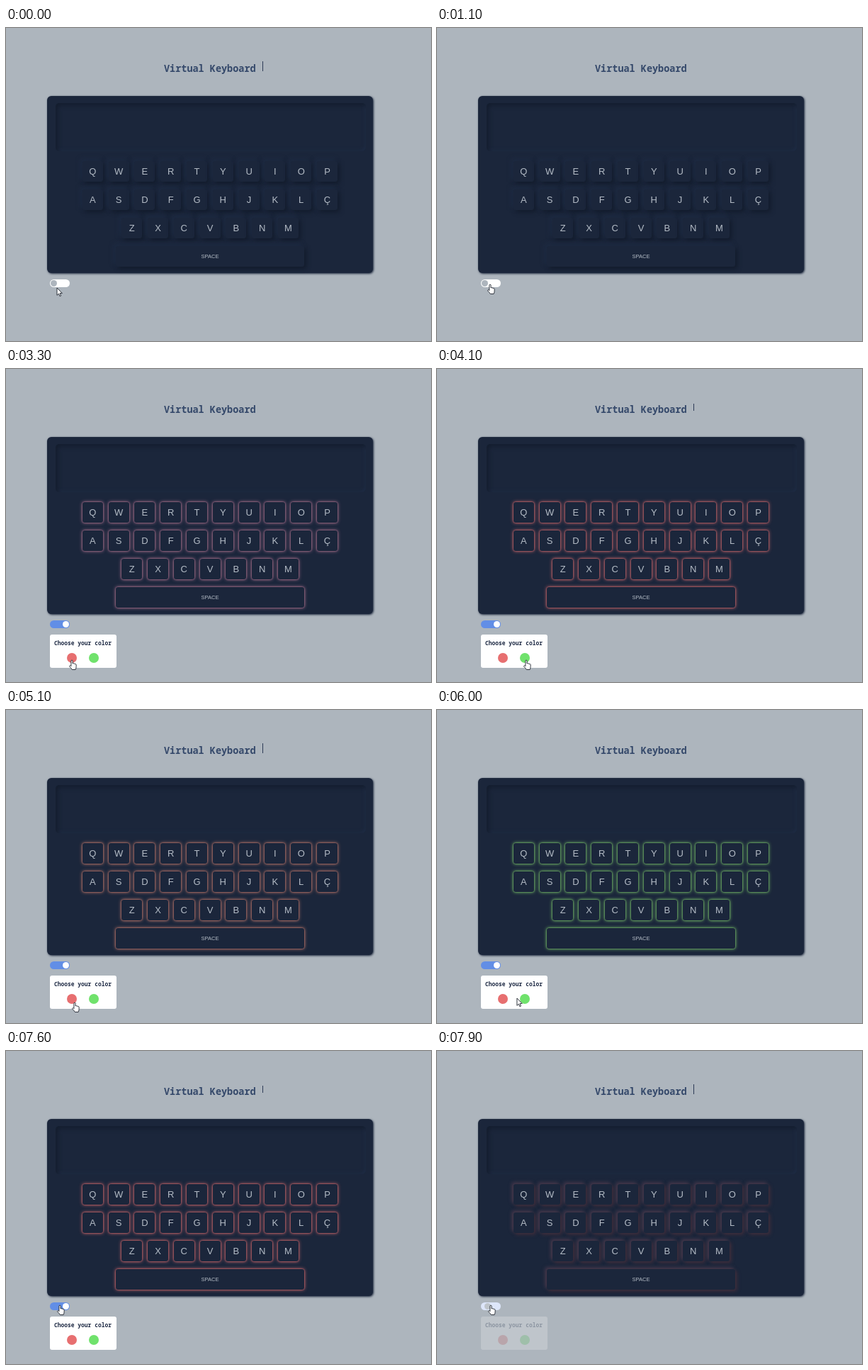
Recreate the animation shown at these times as an HTML page. Size 600 px wide and 442 px high, loop 8 s.

```html
<!DOCTYPE html>
<html lang="en">
<head>
<meta charset="utf-8">
<title>Virtual Keyboard</title>
<style>
  html, body { margin: 0; width: 100%; height: 100%; overflow: hidden; background: #adb5bd; }
  #stage { position: relative; width: 600px; height: 442px; overflow: hidden; background: #adb5bd; }
  #stage * { position: absolute; box-sizing: border-box; white-space: pre; }
  .mono { font-family: "Noto Sans Mono", "DejaVu Sans Mono", monospace; font-weight: 700; }
  #title { left: 223px; top: 47px; font-size: 13.5px; line-height: 20px; color: #34486a; }
  #caret { left: 362px; width: 1px; background: #2c3a55; }
  #board {
    left: 58px; top: 96px; width: 460px; height: 250px; border-radius: 6px;
    background: #1b263b; box-shadow: 1px 1px 3px #1b263b;
  }
  #screen {
    left: 70px; top: 106px; width: 438px; height: 68px; border-radius: 5px;
    box-shadow: inset 3px 3px 6px #141d2e, inset -2px -2px 4px #202d46;
  }
  .key {
    height: 29px; border-radius: 3px; background: #1b263b; color: #b4bcc6;
    font: 13px/29px "Liberation Sans", Arial, sans-serif; text-align: center;
    box-shadow:
      var(--off) var(--off) var(--blur) var(--low),
      calc(var(--off) * -1) calc(var(--off) * -1) var(--blur2) var(--high);
  }
  .key.space { font-size: 7.6px; }
  #track { left: 62px; top: 355px; width: 28px; height: 11px; border-radius: 6px; }
  #knob { top: 356px; width: 9px; height: 9px; border-radius: 50%; }
  #popup { left: 62px; top: 375px; width: 94px; height: 47px; border-radius: 3px; background: #fff; }
  #popup .mono { left: 6px; top: 7px; font-size: 7.95px; line-height: 10px; color: #1f2b45; }
  .dot { top: 26px; width: 14px; height: 14px; border-radius: 50%; }
  #cursor { left: 0; top: 0; overflow: visible; }
  #cursor path { fill: #fff; stroke: #1c222c; stroke-width: .9; stroke-linejoin: round; }
</style>
</head>
<body>
<div id="stage">
  <div id="title" class="mono">Virtual Keyboard</div>
  <div id="caret"></div>
  <div id="board"></div>
  <div id="screen"></div>
  <div id="track"></div>
  <div id="knob"></div>
  <div id="popup">
    <div class="mono">Choose your color</div>
    <div class="dot" style="left:23.5px;background:#e76f70"></div>
    <div class="dot" style="left:55px;background:#70e26c"></div>
  </div>
  <svg id="cursor" width="12" height="16">
    <path id="arrow" d="M0 0V10.4L2.4 8.2L4 11.8L5.6 11.1L4.1 7.6H7.3Z"/>
    <path id="hand" d="M2.6 8.6V1.3a1.1 1.1 0 0 1 2.2 0V5a1 1 0 0 1 1.8.3a1 1 0 0 1 1.7.5a.9.9 0 0 1 1.5.8V9.5Q9.8 11 8.8 13.5H4Q3 11.5.5 9.3A1 1 0 0 1 2 8Z"/>
  </svg>
</div>
<script>
const LOOP = 8000, STEP = 100, BLINK = 700;
const $ = id => document.getElementById(id);
const stage = $('stage');

const BLUE = [98, 142, 230], RED = [231, 111, 112], GREEN = [112, 226, 108];
const WHITE = [255, 255, 255], GRAY = [173, 181, 189];
const DARK = [19, 28, 44], LIGHT = [31, 44, 68];

// Each track is a list of [time, values].
const power = [[1250, [0]], [1650, [1]], [7600, [1]], [8030, [0]]];
const tint = [
  [0, BLUE], [3050, BLUE], [3450, RED], [4200, RED], [4600, GREEN], [4800, GREEN],
  [5200, RED], [5700, RED], [6100, GREEN], [6850, GREEN], [7250, RED]
];
const path = [
  [0, [72, 367]], [500, [75, 362]], [2300, [75, 362]], [2750, [91, 402]],
  [3000, [93, 411]], [3500, [93, 411]], [3900, [126, 411]], [4350, [126, 411]],
  [4700, [97, 413]], [5150, [97, 413]], [5400, [114, 408]], [5600, [124, 407]],
  [5850, [124, 407]], [6250, [89, 407]], [6950, [89, 407]], [7450, [76, 359]]
];

const mix = (a, b, k) => a.map((v, i) => v + (b[i] - v) * k);
const rgb = c => `rgb(${c.map(Math.round)})`;

function at(track, t) {
  const n = track.findIndex(k => k[0] > t);
  if (n === 0) return track[0][1];
  if (n < 0) return track[track.length - 1][1];
  const [t0, a] = track[n - 1], [t1, b] = track[n];
  const k = (t - t0) / (t1 - t0);
  return mix(a, b, k * k * (3 - 2 * k));
}

function addKey(label, x, y, w = 29) {
  const key = document.createElement('div');
  key.className = w > 29 ? 'key space' : 'key';
  key.textContent = label;
  key.style.cssText = `left:${x}px;top:${y}px;width:${w}px`;
  stage.insertBefore(key, $('track'));
}

[['QWERTYUIOP', 107.8, 188], ['ASDFGHJKLÇ', 107.8, 228], ['ZXCVBNM', 163.2, 268]]
  .forEach(([row, x, y]) => [...row].forEach((c, i) => addKey(c, x + i * 36.8, y)));
addKey('SPACE', 155, 308, 266);

function overButton(x, y) {
  const onToggle = x > 62 && x < 90 && y > 355 && y < 366;
  const onDot = [92.5, 124].some(cx => Math.hypot(x - cx, y - 408) < 7.5);
  return onToggle || onDot;
}

function drawCaret(t) {
  const p = t % BLINK;
  const rising = p >= 600;
  const s = $('caret').style;
  s.top = rising ? '49px' : '47px';
  s.height = rising ? '10px' : '14px';
  s.opacity = p < 300 || rising ? 1 : p < 400 ? .4 : 0;
}

function drawCursor(t) {
  const [x, y] = at(path, t);
  const hand = overButton(x, y);
  $('hand').style.display = hand ? '' : 'none';
  $('arrow').style.display = hand ? 'none' : '';
  $('cursor').style.transform = `translate(${x - (hand ? 3.7 : 0)}px, ${y}px)`;
}

function draw(t) {
  const [g] = at(power, t), color = at(tint, t);
  const vars = {
    off: 3 * (1 - g) + 'px',
    blur: 6 - g + 'px',
    blur2: 6 - 4 * g + 'px',
    low: rgb(mix(DARK, color, g)),
    high: rgb(mix(LIGHT, color, g))
  };
  for (const name in vars) stage.style.setProperty('--' + name, vars[name]);
  $('track').style.background = rgb(mix(WHITE, BLUE, g));
  $('knob').style.background = rgb(mix(GRAY, WHITE, g));
  $('knob').style.left = 63 + 16.5 * g + 'px';
  $('popup').style.opacity = g;
  drawCaret(t);
  drawCursor(t);
}

const start = performance.now();
function tick() {
  const t = (performance.now() - start) % LOOP;
  draw(Math.floor(t / STEP) * STEP);
  requestAnimationFrame(tick);
}
tick();
</script>
</body>
</html>
```
